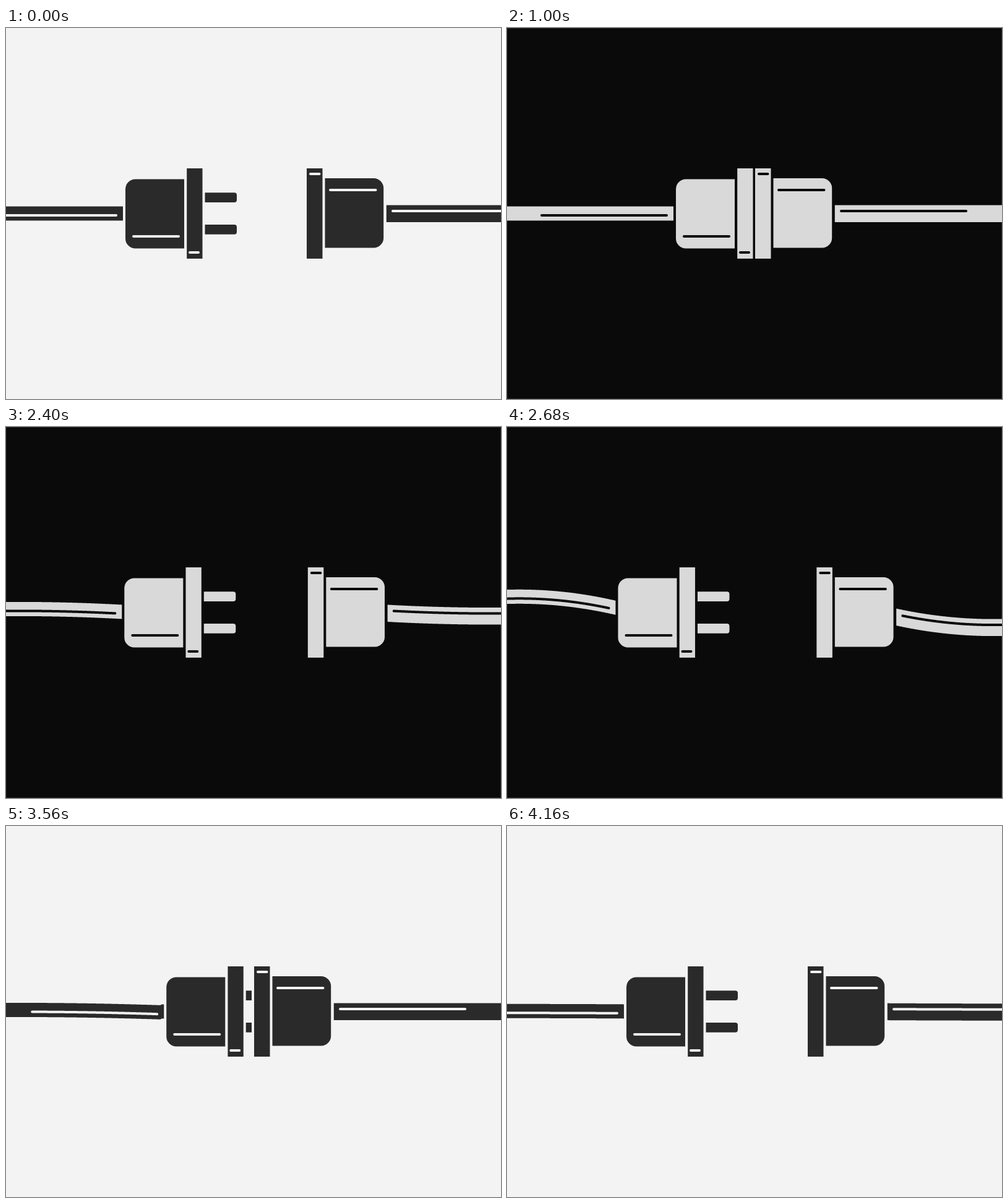
Recreate the animation shown at these times as an HTML page with a canvas. Size 800x600 px, loop 4.2 s.

```html
<!DOCTYPE html>
<html lang="en">
<head>
<meta charset="utf-8">
<title>Plug and socket</title>
<style>
  html, body { margin: 0; width: 100%; height: 100%; overflow: hidden; background: #f3f3f3; }
  canvas { display: block; width: 800px; height: 600px; }
</style>
</head>
<body>
<canvas id="stage" width="800" height="600"></canvas>
<script>
const ctx = document.getElementById('stage').getContext('2d');
const LOOP = 4200, HALF = 2080, STEP = 40;
const LIGHT = { bg: '#f3f3f3', ink: '#2a2a2a', edge: '#f3f3f3' };
const DARK = { bg: '#0a0a0a', ink: '#d9d9d9', edge: '#222222' };

const part = (t, from, to) => Math.min(1, Math.max(0, (t - from) / (to - from)));
const backIn = k => k * k * (4 * k - 3);
const sineOut = k => Math.sin(k * Math.PI / 2);
const sineInOut = k => (1 - Math.cos(k * Math.PI)) / 2;

// 0 = apart, 1 = joined; pulls back before joining, overshoots after parting
function joined(t, partAt) {
  return t < partAt
    ? backIn(part(t, 275, 775))
    : backIn(1 - part(t, partAt, partAt + 500));
}

// Height of the wave in a cable, in pixels
function bend(t, settleAt, partAt) {
  const PEAK = 27.5;
  if (t < 520) return PEAK * sineInOut(part(t, 235, 520));
  if (t < partAt) return PEAK * (1 - sineInOut(part(t, 520, settleAt)));
  if (t < 1720) return PEAK * sineOut(part(t, partAt, 1720));
  return PEAK * (1 - sineInOut(part(t, 1720, 2120)));
}

const arc = (x, mid) => 1 - 2.9e-5 * (x - mid) ** 2;

function box(x, y, w, h, radii = 0) {
  ctx.beginPath();
  ctx.roundRect(x, y, w, h, radii);
  ctx.fill();
}

function curve(x0, x1, y, shift) {
  const points = [];
  for (let x = x0; x < x1; x++) points.push([x, y + shift(x)]);
  points.push([x1, y + shift(x1)]);
  return points;
}

function shine(x0, x1, y, shift = () => 0) {
  ctx.beginPath();
  curve(x0 + 2, x1 - 2, y, shift).forEach(p => ctx.lineTo(...p));
  ctx.stroke();
}

function cable(x0, x1, top, bottom, shift) {
  ctx.beginPath();
  curve(x0, x1, top, shift).forEach(p => ctx.lineTo(...p));
  curve(x0, x1, bottom, shift).reverse().forEach(p => ctx.lineTo(...p));
  ctx.fill();
}

function drawPlug(dx, wave, socketEdge) {
  const shift = x => x < 251 ? -wave * arc(x, 20) : 0;
  cable(-10, 189 + dx, 288.5, 311.5, shift);
  shine(-26 + dx, 180 + dx, 303, shift);

  box(193 + dx, 244.5, 95, 112, [16, 0, 0, 16]);
  shine(204 + dx, 281 + dx, 337);
  box(292.2 + dx, 227, 25.3, 146);
  shine(295 + dx, 313 + dx, 363);

  // The prongs vanish inside the socket
  ctx.save();
  ctx.beginPath();
  ctx.rect(0, 0, socketEdge - 4, 600);
  ctx.clip();
  for (const y of [266.2, 318]) box(321.5 + dx, y, 51.5, 15.8, [0, 4, 4, 0]);
  ctx.restore();
}

function drawSocket(dx, wave) {
  const shift = x => x > 553 ? wave * arc(x, 785) : 0;
  cable(614.8 + dx, 810, 286.5, 314, shift);
  shine(623 + dx, 829 + dx, 296, shift);

  box(486 + dx, 227, 25.5, 146);
  shine(490 + dx, 508.5 + dx, 236);
  box(515.5 + dx, 243, 94.7, 112.5, [0, 16, 16, 0]);
  shine(522 + dx, 599.5 + dx, 262);
}

function draw(time) {
  const t = Math.floor(time / STEP) * STEP;
  const p = t < 2160 ? t : t - HALF;
  const look = t >= 960 && t < 960 + HALF ? DARK : LIGHT;
  const plugX = 80 * joined(p, 1465);
  const socketX = -85 * joined(p, 1495);

  ctx.fillStyle = look.bg;
  ctx.fillRect(0, 0, 800, 600);
  ctx.lineWidth = 1;
  ctx.strokeStyle = look.edge;
  ctx.strokeRect(0.5, 0.5, 799, 599);

  ctx.fillStyle = look.ink;
  ctx.strokeStyle = look.bg;
  ctx.lineWidth = 4;
  ctx.lineCap = 'round';
  ctx.lineJoin = 'round';
  drawPlug(plugX, bend(p, 1000, 1465), 486 + socketX);
  drawSocket(socketX, bend(p, 870, 1495));
}

const start = performance.now();
function tick() {
  draw((performance.now() - start) % LOOP);
  requestAnimationFrame(tick);
}
tick();
</script>
</body>
</html>
```
